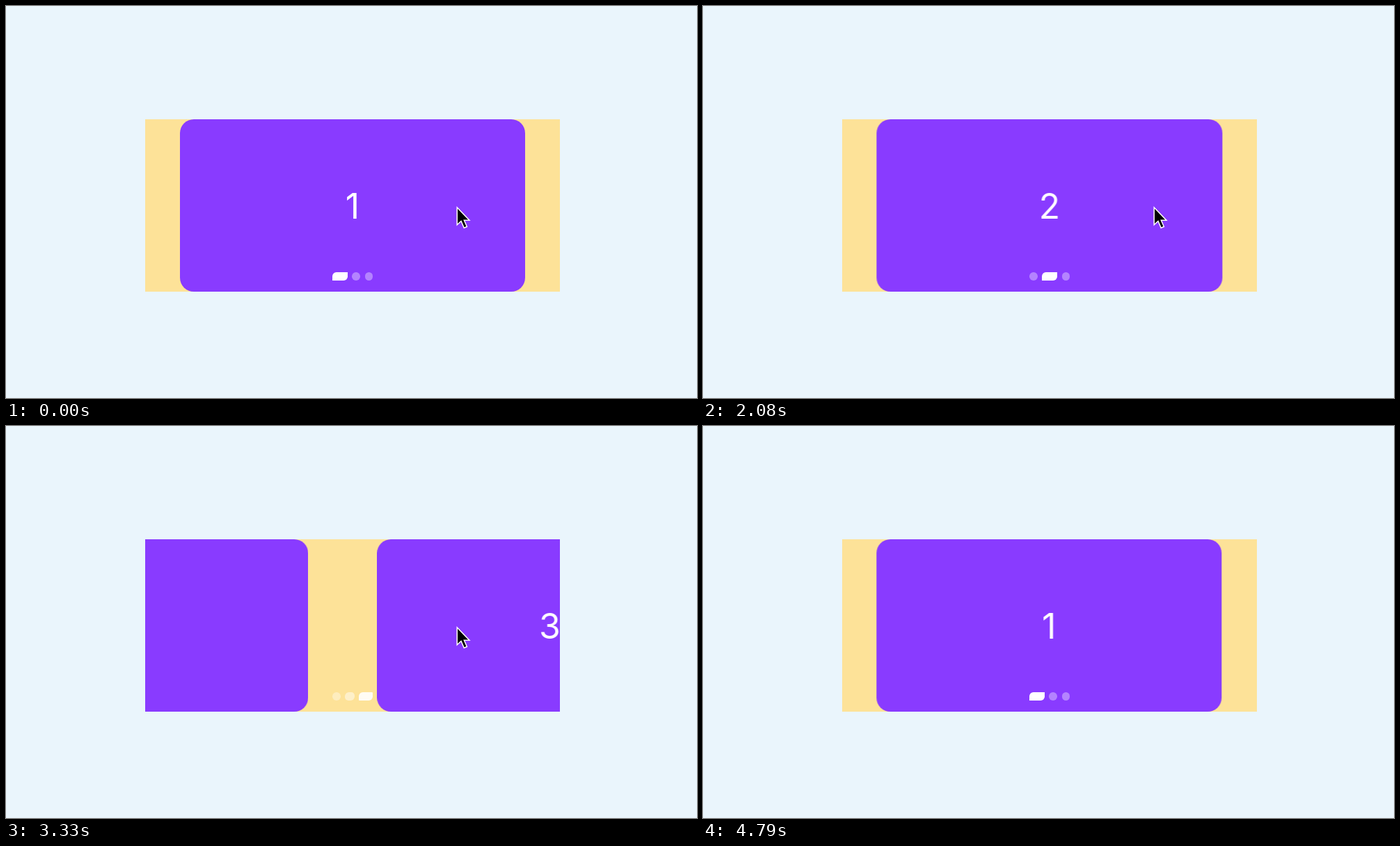
An HTML page that plays this animation: 993 px wide and 564 px high, repeating every 4830 ms.

```html
<!DOCTYPE html>
<html lang="en">
<head>
<meta charset="utf-8">
<title>Carousel</title>
<style>
  html, body { margin: 0; width: 100%; height: 100%; overflow: hidden; background: #eaf5fc; }
  .carousel {
    position: absolute; left: 200.2px; top: 163px; width: 595.6px; height: 248px;
    overflow: hidden; background: #fde298;
  }
  .track { position: absolute; inset: 0; will-change: transform; }
  .card {
    position: absolute; top: 0; width: 496.4px; height: 248px; border-radius: 20px;
    background: #893bff; color: #fff; text-align: center;
    font: 400 50px/250px Inter, Roboto, sans-serif;
  }
  .dots { position: absolute; left: 269px; top: 220px; display: flex; gap: 6.6px; }
  .dot { height: 11.6px; }
  .cursor { position: absolute; left: 640px; top: 280px; overflow: visible; }
</style>
</head>
<body>
<div class="carousel">
  <div class="track"></div>
  <div class="dots"></div>
</div>
<svg class="cursor" width="32" height="46">
  <path d="M9 11.8V33L14.3 28.2L18.6 38.3L21.4 37.1L17.2 27.6H24.2Z"
    fill="#000" stroke="#fff" stroke-width="3" paint-order="stroke"/>
</svg>
<script>
const LOOP = 4830, PITCH = 595.6, DOT = 11.6, GROW = 10, DIM = 0.37;
const clamp = v => Math.min(1, Math.max(0, v));
const track = document.querySelector('.track');
const dotBox = document.querySelector('.dots');
const cursor = document.querySelector('.cursor');

const add = (parent, cls) => {
  const el = document.createElement('div');
  el.className = cls;
  return parent.appendChild(el);
};

const dots = [0, 1, 2].map(i => {
  const card = add(track, 'card');
  card.style.left = 49.7 + i * PITCH + 'px';
  card.textContent = i + 1;
  return add(dotBox, 'dot');
});

// cubic-bezier(.25, .1, .25, 1)
function ease(x) {
  if (x <= 0 || x >= 1) return clamp(x);
  const curve = (s, a, b) => 3 * (1 - s) * s * ((1 - s) * a + s * b) + s ** 3;
  let lo = 0, hi = 1;
  for (let i = 0; i < 24; i++) {
    const mid = (lo + hi) / 2;
    if (curve(mid, .25, .25) < x) lo = mid; else hi = mid;
  }
  return curve(lo, .1, 1);
}

// slow first swipe
function drag(t, start, length) {
  const u = clamp((t - start) / length);
  return 1 - (1 - u) ** 3 * (1 + 3 * u);
}

// quick swipe that settles like a critically damped spring
function flick(t, start) {
  const x = Math.max(0, t - start) / 115;
  return 1 - (1 + x) * Math.exp(-x);
}

function draw(t) {
  const page = drag(t, 685, 1140) + flick(t, 2235) - flick(t, 3147) - flick(t, 3748);
  track.style.transform = `translateX(${-page * PITCH}px)`;

  dots.forEach((dot, i) => {
    const d = page - i;
    const on = d < 0 ? ease(1 + d) : 1 - ease(d);
    const r = DOT / 2;
    dot.style.width = DOT + GROW * on + 'px';
    dot.style.borderRadius = `${r}px ${r * (1 - on)}px`;
    dot.style.background = `rgba(255,255,255,${DIM + (1 - DIM) * on})`;
  });

  const out = clamp((t - 4590) / 180) ** 2;
  cursor.style.transform = `translate(${40 * out}px, ${-290 * out}px)`;
  cursor.style.visibility = t < 4780 ? 'visible' : 'hidden';
}

const begin = performance.now();
function tick() {
  draw((performance.now() - begin) % LOOP);
  requestAnimationFrame(tick);
}
tick();
</script>
</body>
</html>
```
